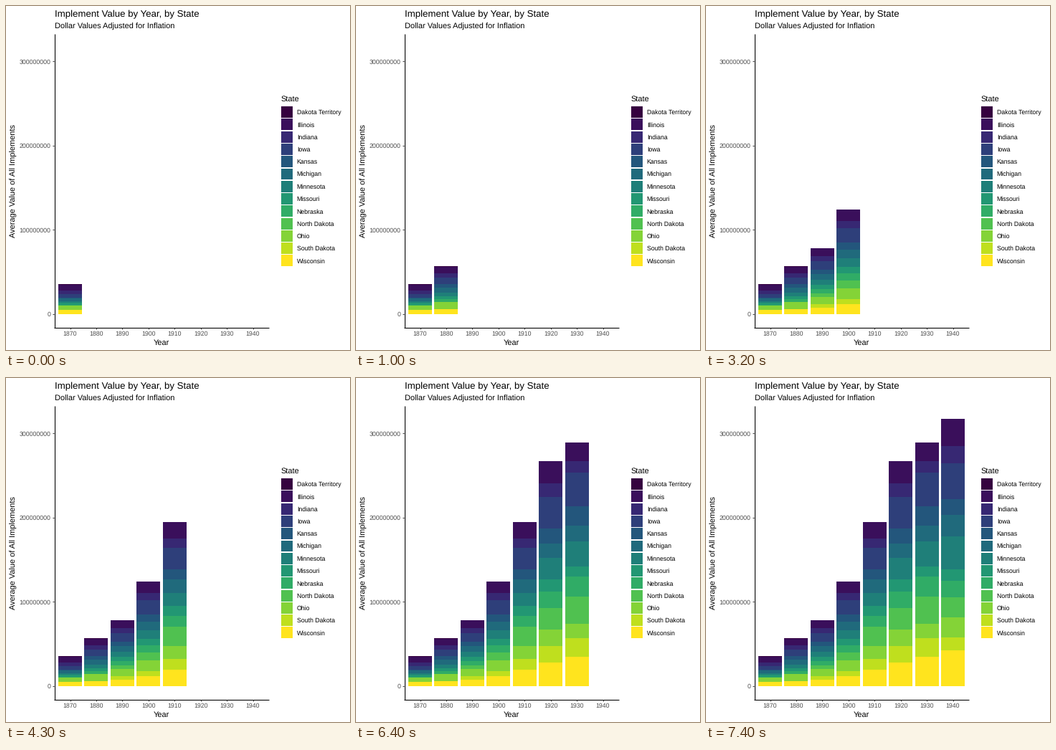
A matplotlib script that plays this animation: 480 by 480 pixels, repeating every 10 s.

```python
import matplotlib.pyplot as plt
from matplotlib.animation import FuncAnimation
from matplotlib.patches import Rectangle

plt.rcParams["font.family"] = "Liberation Sans"
plt.rcParams["text.hinting"] = "none"

SIZE = 480
DPI = 72  # one point equals one pixel
STEP = 100
LOOP = 10000

STATES = {
    "Dakota Territory": "#35013f",
    "Illinois": "#3a0f5b",
    "Indiana": "#372873",
    "Iowa": "#2e3f7a",
    "Kansas": "#23567c",
    "Michigan": "#206a7c",
    "Minnesota": "#1f7f79",
    "Missouri": "#229773",
    "Nebraska": "#30ac66",
    "North Dakota": "#50c150",
    "Ohio": "#84d337",
    "South Dakota": "#bfdf1e",
    "Wisconsin": "#ffe41e",
}

# Layer heights in pixels, top to bottom, in the order of STATES
LAYERS = {
    1870: [1, 8, 5, 5, 1, 4, 2, 3, 1, 0, 6, 0, 6],
    1880: [1, 9, 6, 9, 5, 7, 5, 4, 4, 0, 10, 0, 7],
    1890: [0, 11, 7, 12, 6, 8, 7, 6, 6, 5, 10, 5, 9],
    1900: [0, 16, 10, 20, 10, 12, 12, 9, 10, 11, 15, 7, 14],
    1910: [0, 23, 13, 30, 14, 19, 18, 14, 15, 27, 18, 15, 23],
    1920: [0, 31, 19, 44, 21, 20, 30, 17, 23, 30, 23, 23, 33],
    1930: [0, 26, 16, 47, 27, 22, 35, 14, 28, 38, 20, 26, 41],
    1940: [0, 38, 24, 50, 22, 30, 46, 16, 23, 28, 28, 18, 50],
}
STARTS = [0, 1000, 2100, 3200, 4300, 5400, 6400, 7400]

BASE_Y = 430
BAR_W = 33
BAR_GAP = 36.43
GREY = "#4d4d4d"

fig = plt.figure(figsize=(SIZE / DPI, SIZE / DPI), dpi=DPI, facecolor="white")
ax = fig.add_axes([0, 0, 1, 1])
ax.set_xlim(0, SIZE)
ax.set_ylim(SIZE, 0)
ax.axis("off")


def label(x, y, text, size, color="black", **kw):
    ax.text(x, y, text, fontsize=size, color=color, va="baseline", **kw)


def line(xs, ys, color="black"):
    ax.plot(xs, ys, color=color, lw=1.07, solid_capstyle="butt")


def box(x, y, w, h, color, smooth=False):
    patch = Rectangle((x, y), w, h, facecolor=color, lw=0, antialiased=smooth)
    return ax.add_patch(patch)


def draw_axes():
    line([67.5, 67.5], [38.7, 449])
    line([67, 366.5], [448.5, 448.5])
    for k in range(4):
        y = 429.8 - 117.55 * k
        line([64.6, 67], [y, y], "#333333")
        label(62.3, y + 3.3, str(k * 10**8), 8.8, GREY, ha="right")
    for i, year in enumerate(LAYERS):
        x = 89.5 + BAR_GAP * i
        line([x, x], [449, 451.4], "#333333")
        label(x, 460, str(year), 8.8, GREY, ha="center")
    label(67.5, 15.2, "Implement Value by Year, by State", 13.2)
    label(67.5, 32, "Dollar Values Adjusted for Inflation", 11)
    label(217, 473, "Year", 11, ha="center")
    ax.text(13.6, 244, "Average Value of All Implements", fontsize=11,
            rotation=90, ha="right", va="center").set(
                ha="center", va="baseline", rotation_mode="anchor")


def draw_legend():
    label(383, 133, "State", 11)
    for i, (state, color) in enumerate(STATES.items()):
        y = 140.1 + 17.28 * i
        box(383.9, y, 15.9, 15.9, color, smooth=True)
        label(405.7, y + 11.1, state, 8.8)


def make_bar(index, heights):
    x = round(73 + BAR_GAP * index)
    y = BASE_Y - sum(heights)
    parts = []
    for h, color in zip(heights, STATES.values()):
        if h:
            parts.append(box(x, y, BAR_W, h, color))
        y += h
    return parts


draw_axes()
draw_legend()
bars = [make_bar(i, heights) for i, heights in enumerate(LAYERS.values())]


def update(frame):
    now = frame * STEP
    for start, parts in zip(STARTS, bars):
        for part in parts:
            part.set_visible(now >= start)
    return [part for parts in bars for part in parts]


anim = FuncAnimation(fig, update, frames=LOOP // STEP, interval=STEP,
                     repeat=True, repeat_delay=0, blit=False)
plt.show()
```
